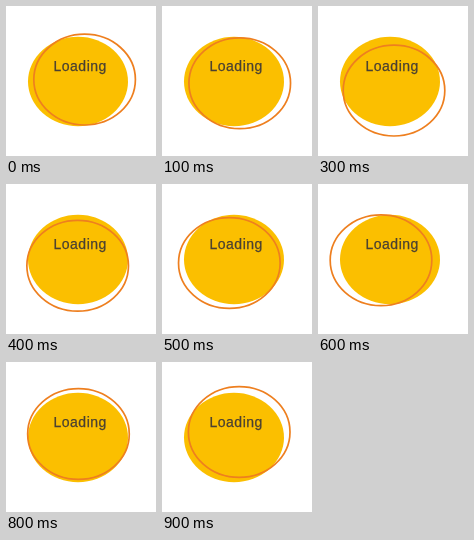
Write an HTML page that moves like this. It is 150 by 150 pixels and loops after 1 s.

```html
<!DOCTYPE html>
<html lang="en">
<head>
<meta charset="utf-8">
<title>Loading</title>
<style>
  html, body { margin: 0; width: 100%; height: 100%; overflow: hidden; background: #fff; }
  svg { display: block; width: 100%; height: 100%; }
  text { font: 14px "Liberation Sans", Arial, sans-serif; letter-spacing: 0.5px; fill: #4a4032; stroke: #4a4032; stroke-width: 0.25px; }
</style>
</head>
<body>
<svg viewBox="0 0 150 150">
  <ellipse cx="72" cy="75.5" rx="50" ry="44.7" fill="#fbbf00"/>
  <ellipse id="ring" rx="50.8" ry="45.4" fill="none" stroke="#ee7f1f" stroke-width="1.7"/>
  <text x="47.5" y="65">Loading</text>
</svg>
<script>
  const LOOP = 1000, STEP = 100;
  // Corners of the ring's path: time, centre x, centre y
  const path = [
    [0, 78.6, 73.6],
    [300, 76, 84.6],
    [600, 63, 76.2],
    [900, 77.2, 70],
    [1000, 78.6, 73.6]
  ];
  const ring = document.getElementById("ring");

  function centreAt(t) {
    const i = path.findIndex(p => p[0] > t);
    const [t0, x0, y0] = path[i - 1];
    const [t1, x1, y1] = path[i];
    const k = (t - t0) / (t1 - t0);
    return [x0 + (x1 - x0) * k, y0 + (y1 - y0) * k];
  }

  function draw(now) {
    const t = Math.floor((now % LOOP) / STEP) * STEP;
    const [x, y] = centreAt(t);
    ring.setAttribute("cx", x);
    ring.setAttribute("cy", y);
  }

  function tick() {
    draw(performance.now());
    requestAnimationFrame(tick);
  }
  tick();
</script>
</body>
</html>
```
